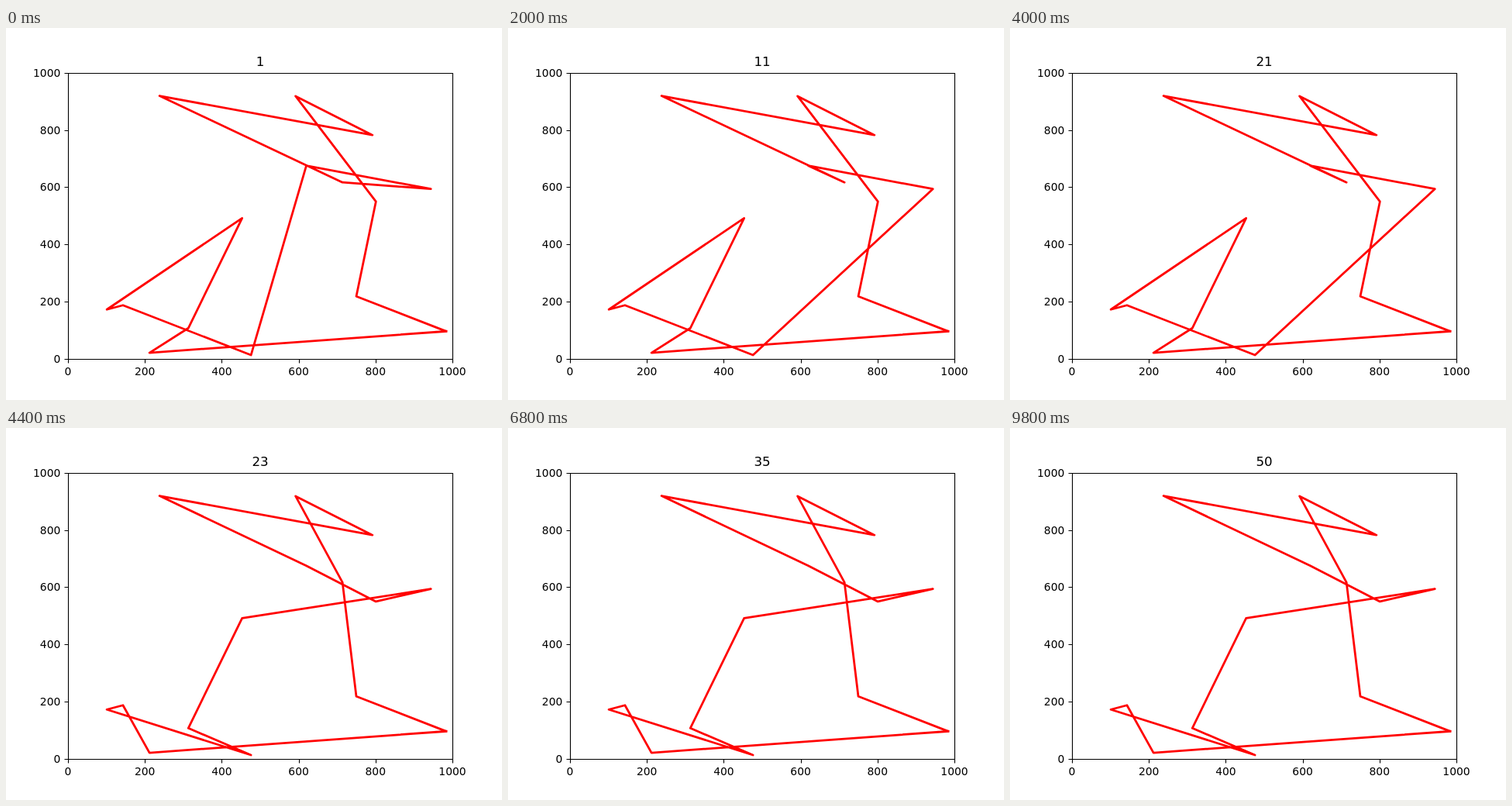
Write an HTML page that moves like this. It is 640 px wide and 480 px high and loops after 10 s.

```html
<!DOCTYPE html>
<html lang="en">
<head>
<meta charset="utf-8">
<title>Route search</title>
<style>
  html, body { margin: 0; width: 100%; height: 100%; overflow: hidden; background: #fff; }
  svg { display: block; width: 640px; height: 480px; }
  text { font: 13.889px "DejaVu Sans", sans-serif; fill: #000; }
  #title { font-size: 16.667px; text-anchor: middle; }
  #route { fill: none; stroke: #f00; stroke-width: 2.78; stroke-linejoin: round; stroke-linecap: square; }
  #axes { fill: none; stroke: #000; stroke-width: 1.11; }
</style>
</head>
<body>
<svg viewBox="0 0 640 480">
  <rect width="640" height="480" fill="#fff"/>
  <polyline id="route"/>
  <path id="axes"/>
  <g id="labels"></g>
  <text id="title" x="328" y="49"></text>
</svg>
<script>
const STEP = 200, STEPS = 50;
const $ = id => document.getElementById(id);
const px = v => 80 + v * 0.496;
const py = v => 427.2 - v * 0.3696;
const snap = v => Math.round(v) + 0.5;

// Cities in data units; tours list them by letter.
const cities = {
  A: [984, 97], B: [750, 219], C: [801, 550], D: [592, 918], E: [792, 782],
  F: [238, 919], G: [714, 617], H: [944, 594], I: [620, 675], J: [476, 14],
  K: [143, 188], L: [101, 173], M: [453, 492], N: [313, 108], O: [212, 22]
};
const tours = [
  { from: 0, order: 'ABCDEFGHIJKLMNOA' },
  { from: 600, order: 'ABCDEFGIHJKLMNOA' },
  { from: 4400, order: 'ABGDEFICHMNJLKOA' }
];
for (const tour of tours) {
  tour.points = [...tour.order].map(c => {
    const [x, y] = cities[c];
    return px(x).toFixed(2) + ',' + py(y).toFixed(2);
  }).join(' ');
}

function addLabel(text, x, y, anchor) {
  const el = document.createElementNS('http://www.w3.org/2000/svg', 'text');
  el.setAttribute('x', x);
  el.setAttribute('y', y);
  el.setAttribute('text-anchor', anchor);
  el.textContent = text;
  $('labels').append(el);
}

function drawAxes() {
  let d = 'M80.5 58.5H576.5V427.5H80.5Z';
  for (let v = 0; v <= 1000; v += 200) {
    const x = snap(px(v)), y = snap(py(v));
    d += `M${x} 427.5v5M80.5 ${y}h-5`;
    addLabel(v, px(v), 448, 'middle');
    addLabel(v, 70.3, Math.round(py(v) + 5), 'end');
  }
  $('axes').setAttribute('d', d);
}

let shown = -1;
function render(time) {
  const step = Math.floor(time / STEP) % STEPS;
  if (step === shown) return;
  shown = step;
  const tour = tours.findLast(t => t.from <= step * STEP);
  $('route').setAttribute('points', tour.points);
  $('title').textContent = step + 1;
}

drawAxes();
const start = performance.now();
function tick() {
  render(performance.now() - start);
  requestAnimationFrame(tick);
}
tick();
</script>
</body>
</html>
```
